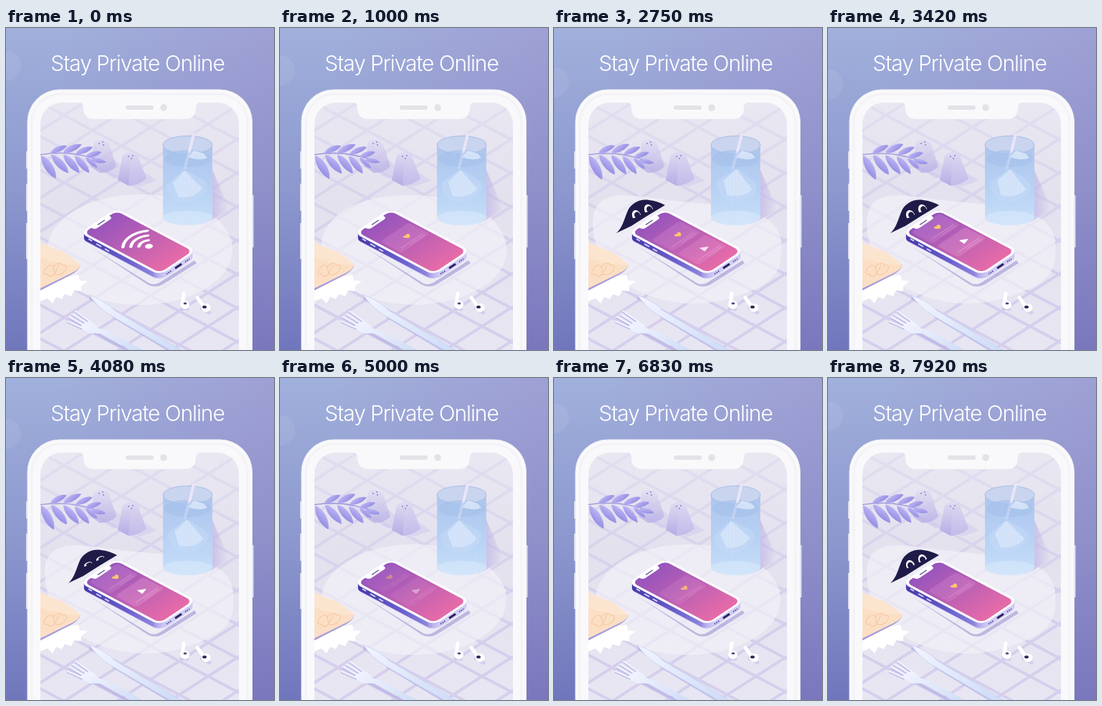
Recreate the animation shown at these times as an HTML page. Size 374 by 449 pixels, loop 8 s.

```html
<!DOCTYPE html>
<html lang="en">
<head>
<meta charset="utf-8">
<title>Stay Private Online</title>
<style>
  html, body { margin: 0; width: 100%; height: 100%; overflow: hidden; }
  svg { display: block; width: 374px; height: 449px; }
  .title { font: 300 30px Inter, sans-serif; font-optical-sizing: none; letter-spacing: -1.08px; fill: #fff; }
</style>
</head>
<body>
<svg viewBox="0 0 374 449">
  <defs>
    <linearGradient id="sky" x2="0" y2="1"><stop stop-color="#a1b0dc"/><stop offset=".5" stop-color="#8c98ce"/><stop offset="1" stop-color="#7076bc"/></linearGradient>
    <linearGradient id="dusk" x2="1" y2="0"><stop offset=".2" stop-color="#9878c0" stop-opacity="0"/><stop offset="1" stop-color="#9878c0" stop-opacity=".28"/></linearGradient>
    <linearGradient id="table" x2="0" y2="1"><stop stop-color="#e9e7f2"/><stop offset=".4" stop-color="#e4e1ee"/><stop offset="1" stop-color="#e8e6f2"/></linearGradient>
    <linearGradient id="weave" gradientUnits="userSpaceOnUse" x2="0" y1="110" y2="340"><stop stop-color="#cdc5ea" stop-opacity=".25"/><stop offset="1" stop-color="#cdc5ea" stop-opacity=".7"/></linearGradient>
    <linearGradient id="screen" x2="1" y2="0"><stop stop-color="#9654bd"/><stop offset=".5" stop-color="#bd60b3"/><stop offset="1" stop-color="#e76ba8"/></linearGradient>
    <linearGradient id="side" gradientUnits="userSpaceOnUse" x2="112"><stop stop-color="#4135a2"/><stop offset=".6" stop-color="#6c60cd"/><stop offset=".9" stop-color="#8d84dc"/><stop offset="1" stop-color="#d3cff6"/></linearGradient>
    <linearGradient id="leaf" x2="1" y2="1"><stop stop-color="#c3bdf9"/><stop offset="1" stop-color="#8c85de"/></linearGradient>
    <linearGradient id="shaker" x2="0" y2="1"><stop stop-color="#e0dbf2"/><stop offset="1" stop-color="#b5ace4"/></linearGradient>
    <linearGradient id="glass" x2="0" y2="1"><stop stop-color="#b2c6ec"/><stop offset=".5" stop-color="#b9d2f4"/><stop offset="1" stop-color="#cbe2fa"/></linearGradient>
    <linearGradient id="shade" x2="1" y2="0"><stop stop-color="#bdb3e6" stop-opacity=".8"/><stop offset="1" stop-color="#bdb3e6" stop-opacity="0"/></linearGradient>
    <linearGradient id="metal" x2="1" y2="1"><stop stop-color="#f3f5ff"/><stop offset="1" stop-color="#cddbf6"/></linearGradient>
    <clipPath id="display"><path d="M48 449V134a30 30 0 0 1 30-30H295a30 30 0 0 1 30 30V449Z"/></clipPath>
    <clipPath id="handsetClip"><rect x="3" y="3" width="106" height="46" rx="7"/></clipPath>
  </defs>

  <rect width="374" height="449" fill="url(#sky)"/>
  <rect width="374" height="449" fill="url(#dusk)"/>
  <circle id="bubble" r="21" fill="#fff" opacity=".07"/>
  <text class="title" x="183.500" y="59.500" text-anchor="middle">Stay Private Online</text>

  <!-- device frame -->
  <path d="M29.200 172v24M29.200 217v38M29.200 272v50M344.300 233v73" stroke="#dfdfee" stroke-width="2.400"/>
  <path d="M30 460V131a45 45 0 0 1 45-45H298.500a45 45 0 0 1 45 45V460Z" fill="#f9f9fb" stroke="#ededf3"/>
  <path d="M36 460V132a40 40 0 0 1 40-40H297a40 40 0 0 1 40 40V460Z" fill="none" stroke="#f3f3f7" stroke-width="3"/>

  <g clip-path="url(#display)">
    <rect x="48" y="104" width="277" height="345" fill="url(#table)"/>
    <path id="plaid" fill="none" stroke="url(#weave)" stroke-width="4"/>
    <path id="halo" fill="#f2f1f8" opacity=".7"/>

    <!-- shakers -->
    <path d="M128 196l24-12 20 18-22 8ZM165 213l25-14 21 14-24 8Z" fill="#c9c0ea" opacity=".4"/>
    <path d="M122 163Q123 156 132 156Q142 156 144 162L154 193Q146 202 131 202L119 194Z" fill="url(#shaker)" opacity=".75"/>
    <path d="M162 181Q164 174 173 173Q184 174 185 181L196 210Q186 219 171 220L156 212Z" fill="url(#shaker)"/>
    <path d="M185 181L196 210Q186 219 171 220L173 188Z" fill="#d6d0f0" opacity=".4"/>
    <g fill="#8b80c4"><circle cx="130" cy="161" r="1"/><circle cx="135" cy="159" r="1"/><circle cx="136" cy="163" r="1"/><circle cx="171" cy="179" r="1"/><circle cx="177" cy="178" r="1"/><circle cx="175" cy="182" r="1"/></g>

    <g id="branch"><path d="M46 177Q92 169 138 188" fill="none" stroke="#9a93dc" stroke-width="1.300"/></g>

    <!-- glass -->
    <path d="M288 198L312 253L283 270Z" fill="url(#shade)"/>
    <path d="M219 163V264A34.500 11 0 0 0 288 264V163Z" fill="url(#glass)"/>
    <ellipse cx="253.500" cy="163" rx="34.500" ry="12.500" fill="#c9d4ef" stroke="#a6bfe9"/>
    <ellipse cx="253.500" cy="182" rx="33" ry="12" fill="#a9c4ec" opacity=".7"/>
    <path d="M262 148L256 172" stroke="#e9e5f9" stroke-width="4" stroke-linecap="round"/>
    <path d="M256 172L249 197" stroke="#d3dcf6" stroke-width="4" opacity=".6"/>
    <path d="M254 180L262 171L276 175L281 181Q268 186 254 180Z" fill="#dde8fa" opacity=".9"/>
    <g id="ice">
      <path d="M224 217L247 199Q252 197 257 201L278 214Q283 222 277 231L262 241Q248 247 236 239Q223 230 224 217Z" fill="#c9dcf8" opacity=".6"/>
      <path d="M250 198L274 224Q263 238 240 235L233 215Z" fill="#e2ebfc" opacity=".7"/>
    </g>
    <path id="ribs" stroke="#83b5e8" stroke-width=".7" opacity=".22"/>
    <path d="M219 264A34.500 11 0 0 0 288 264A34.500 9 0 0 0 219 264Z" fill="#d9eafc" opacity=".6"/>

    <!-- snack -->
    <path id="paper" d="M48 354L101 344L103 352L114 353L105 360L105 367L95 366L91 374L82 371L78 378L70 375L65 384L58 377L48 381Z" fill="#fff"/>
    <path d="M104 330Q102 338 91 344L48 366V360Z" fill="#a79cdc"/>
    <path d="M48 299Q66 308 80 312Q92 320 104 330Q102 337 91 342L48 363Z" fill="#fbdfc5"/>
    <path d="M48 299Q66 308 80 312Q92 320 104 330Q77 331 48 320Z" fill="#fce8d5" opacity=".7"/>
    <path d="M54 337q7-10 12-4q8-9 13-2q9-1 3 8q-6 7-14 4q-7 7-10 0q-8 2-4-6M66 333l2 10M74 330l-6 13" fill="none" stroke="#f5caa5" stroke-width="1.200"/>

    <!-- cutlery -->
    <g stroke-linejoin="round" stroke-linecap="round">
      <g transform="translate(0 4)" fill="none" stroke="#b4b2e6" opacity=".7">
        <path d="M118 373Q144 389 151 399L239 452" stroke-width="4"/>
        <path d="M112 418Q128 421 134 426L184 453" stroke-width="4"/>
      </g>
      <path d="M116 372Q140 381 152 394L245 449L239 455L148 402Q128 390 116 372Z" fill="url(#metal)" stroke="#c3cdf0" stroke-width=".7"/>
      <path d="M86 409L106 418M88 403L109 415M92 399L113 412M97 395L118 410" transform="translate(0 1.500)" stroke="#b9b8e8" stroke-width="2.200"/>
      <path d="M86 409L106 418M88 403L109 415M92 399L113 412M97 395L118 410" stroke="#f4f5ff" stroke-width="2"/>
      <path d="M104 416Q110 410 117 409Q126 412 128 418Q134 420 143 423L191 449L185 455L136 427Q126 425 118 426Q108 424 104 416Z" fill="url(#metal)"/>
    </g>

    <!-- earbuds -->
    <g fill="none" stroke-linecap="round">
      <path d="M245 390L253 392M273 391L284 397" stroke="#c3b9e9" stroke-width="5" opacity=".5"/>
      <path d="M248 370L246 385M267 376L275 387" stroke="#fff" stroke-width="5"/>
    </g>
    <ellipse cx="249.500" cy="386" rx="6.500" ry="6" fill="#fff"/><ellipse cx="279" cy="390" rx="6.500" ry="6" fill="#fff"/>
    <ellipse cx="250" cy="384" rx="2.400" ry="1.600" fill="#4c4782"/><ellipse cx="277" cy="389" rx="3" ry="2" fill="#2e2b58"/>

    <g id="spy">
      <path d="M87 286C95 279 98 267 102 257C107 244 120 238 133 240C142 241 149 244 155 247L130 262L108 276Z" fill="#1f1b49"/>
      <g id="eyes"></g>
    </g>

    <!-- handset on the table -->
    <path d="M116 304L200 356Q207 359 214 355L263 324L266 328L218 358Q208 363 198 358Z" fill="#8176c6" opacity=".45"/>
    <g id="handset"></g>
    <g transform="matrix(1 .528 -.98 .66 154 251.500)">
      <rect width="112" height="52" rx="10" fill="#fff"/>
      <rect x="3" y="3" width="106" height="46" rx="7" fill="url(#screen)"/>
      <path d="M2 13Q8 13 8 17V35Q8 39 2 39Z" fill="#fff"/>
      <path d="M4.500 21v10" stroke="#4b4387" stroke-width="1.200"/>
      <g clip-path="url(#handsetClip)">
        <g id="wifi" fill="none" stroke="#fff" stroke-width="3.400" stroke-linecap="round"></g>
        <g id="likeCard">
          <rect x="-15" y="-17" width="30" height="40" rx="4" fill="#e6a7dc" opacity=".2"/>
          <path d="M9 -13V18M12 -13V8" stroke="#e7aadc" opacity=".5"/>
          <path transform="rotate(-90) scale(.68)" d="M0 5C-9 -1 -5 -7 0 -3C5 -7 9 -1 0 5Z" fill="#ffc76d"/>
        </g>
        <g id="playCard">
          <rect x="-15" y="-17" width="30" height="40" rx="4" fill="#f0b1df" opacity=".24"/>
          <path d="M9 -13V18M12 -13V8" stroke="#f3bfe2" opacity=".5"/>
          <path transform="scale(.72)" d="M-5 3L2 -6L5 4Z" fill="#fff" stroke="#fff" stroke-linejoin="round"/>
        </g>
      </g>
    </g>
    <path d="M115 294l5 3M126 301l7 4M138 308l6 3.500" stroke="#d6d2fa" stroke-width="2"/>
    <path d="M236 335l9-6" stroke="#28225e" stroke-width="3"/>
    <path d="M224 343l7-4.500M250 326l6-4" stroke="#4d4592" stroke-width="2" stroke-dasharray="1.500 1.500"/>
  </g>

  <!-- notch -->
  <path d="M101 103Q108 104 108 111Q108 127 124 127H249Q265 127 265 111Q265 104 272 103Z" fill="#f9f9fb"/>
  <rect x="167" y="108" width="39" height="6" rx="3" fill="#e3e2e8"/>
  <circle cx="220" cy="111" r="4.800" fill="#e3e2e8"/>
</svg>
<script>
const LOOP = 8000, CYCLE = 6000;
const $ = id => document.getElementById(id);
const lerp = (a, b, k) => a + (b - a) * k;
const smooth = k => k * k * (3 - 2 * k);

function add(parent, tag, attributes) {
  const node = document.createElementNS('http://www.w3.org/2000/svg', tag);
  for (const key in attributes) node.setAttribute(key, attributes[key]);
  return parent.appendChild(node);
}

// Eased value between [time, value] stops.
function track(time, ...stops) {
  const next = stops.findIndex(stop => stop[0] > time);
  if (next === 0) return stops[0][1];
  if (next < 0) return stops.at(-1)[1];
  const [t0, v0] = stops[next - 1], [t1, v1] = stops[next];
  return lerp(v0, v1, smooth((time - t0) / (t1 - t0)));
}

let plaid = '';
for (let y = -40; y < 650; y += 47) {
  plaid += `M40 ${y}L335 ${y - 189}M40 ${y - 142}L335 ${y + 14}`;
}
$('plaid').setAttribute('d', plaid);

let ribs = '';
for (let x = 221; x < 288; x += 2.5) {
  const bow = Math.sqrt(1 - ((x - 253.5) / 34.5) ** 2);
  ribs += `M${x} ${164 + 12 * bow}V${263 + 10 * bow}`;
}
$('ribs').setAttribute('d', ribs);

// x, y, angle and length of each leaf
const leaves = [
  [49, 178, 60, 38], [63, 177, 49, 35], [80, 177, 50, 34], [96, 179, 50, 31], [111, 181, 42, 22],
  [62, 174, -24, 25], [80, 174, -25, 28], [97, 176, -22, 26], [111, 180, -16, 23], [119, 184, 12, 21]
].map(([x, y, angle, length]) => {
  const node = add($('branch'), 'path', {
    d: `M0 0C${length * .25} ${-length * .24} ${length * .8} ${-length * .2} ${length} 0C${length * .7} ${length * .18} ${length * .25} ${length * .18} 0 0Z`,
    fill: 'url(#leaf)'
  });
  return { node, x, y, angle };
});

for (let depth = 8; depth > 0; depth--) {
  add($('handset'), 'rect', {
    width: 112, height: 52, rx: 10, fill: depth === 8 ? '#d3cff6' : 'url(#side)',
    transform: `matrix(1 .528 -.98 .66 154 ${251.5 + depth})`
  });
}

for (const r of [10, 18, 26]) {
  const dx = r * .74, dy = r * .67;
  add($('wifi'), 'path', { d: `M${69.5 - dx} ${24.5 - dy}A${r} ${r} 0 0 0 ${69.5 - dx} ${24.5 + dy}` });
}
add($('wifi'), 'circle', { cx: 69.5, cy: 24.5, r: 2.2, fill: '#fff' });

const eyes = [[114, 259], [131, 251]].map(([x, y]) => {
  const node = add($('eyes'), 'g', {});
  add(node, 'path', { d: 'M-6 4C-6 -2 -3 -5 0 -5C4 -5 6 -1 6 4Q0 6 -6 4Z', fill: '#fff' });
  const pupil = add(node, 'ellipse', { cy: 2.5, rx: 4, ry: 4.5, fill: '#1f1b49' });
  return { node, pupil, x, y };
});

const blob = [[317, 318], [284, 362], [187, 384], [92, 352], [56, 290], [72, 238], [160, 240], [290, 262]];

function haloPath(k) {
  const points = blob.map(([x, y], i) => {
    const angle = i * Math.PI / 4;
    return [lerp(187 + 129 * Math.cos(angle), x, k), lerp(309 + 77 * Math.sin(angle), y, k)];
  });
  const at = i => points[(i + 8) % 8];
  const handle = (i, sign) => at(i).map((v, axis) => v + sign * (at(i + 1)[axis] - at(i - 1)[axis]) * .1875);
  return 'M' + points[0] + points.map((_, i) => `C${handle(i, 1)} ${handle(i + 1, -1)} ${at(i + 1)}`).join('') + 'Z';
}

function place(node, transform, opacity = 1) {
  node.setAttribute('transform', transform);
  node.setAttribute('opacity', opacity);
}

function draw(now) {
  const time = now % LOOP, phase = time % CYCLE;
  const drift = shift => Math.cos((time - 3700) / LOOP * Math.PI * 2 + shift);

  $('bubble').setAttribute('cy', 66 + 13 * drift(0));
  place($('branch'), `rotate(${drift(0) * .6} 48 176)`);
  leaves.forEach(({ node, x, y, angle }, i) =>
    place(node, `translate(${x} ${y}) rotate(${angle + 2 * drift(i * .5)})`));
  place($('ice'), `translate(${1 + drift(.8) * 2} ${-drift(.8)}) rotate(${drift(.8) * 5} 252 220)`);

  const risen = track(phase, [850, 0], [1500, 1], [4100, 1], [4600, 0]);
  const hidden = 1 - risen;
  place($('spy'), `translate(${hidden * 36} ${hidden * 22}) translate(135 272) scale(${lerp(.6, 1, risen)}) translate(-135 -272)`, risen > 0 ? 1 : 0);
  $('halo').setAttribute('d', haloPath(risen));

  const open = track(phase, [3750, 1], [4000, .4]);
  const gaze = track(phase, [2100, 0], [2500, 1.2]);
  for (const { node, pupil, x, y } of eyes) {
    place(node, `translate(${x} ${y}) rotate(-25) scale(1 ${open})`);
    pupil.setAttribute('cx', gaze);
  }

  const cards = track(phase, [550, 0], [950, 1], [4700, 1], [5250, 0]);
  const playing = track(phase, [2500, 0], [2850, 1], [4700, 1], [5250, 0]);
  const likeX = track(phase, [550, 57], [1100, 44.5], [2580, 44.5], [3350, 21.5]);
  place($('likeCard'), `translate(${likeX} 22.5)`, cards);
  place($('playCard'), `translate(${likeX + 36} 22.5)`, playing);
  $('wifi').setAttribute('opacity', track(phase, [250, 1], [600, 0], [5200, 0], [5600, 1]));
}

const start = performance.now();
function tick() {
  draw(performance.now() - start);
  requestAnimationFrame(tick);
}
tick();
</script>
</body>
</html>
```
